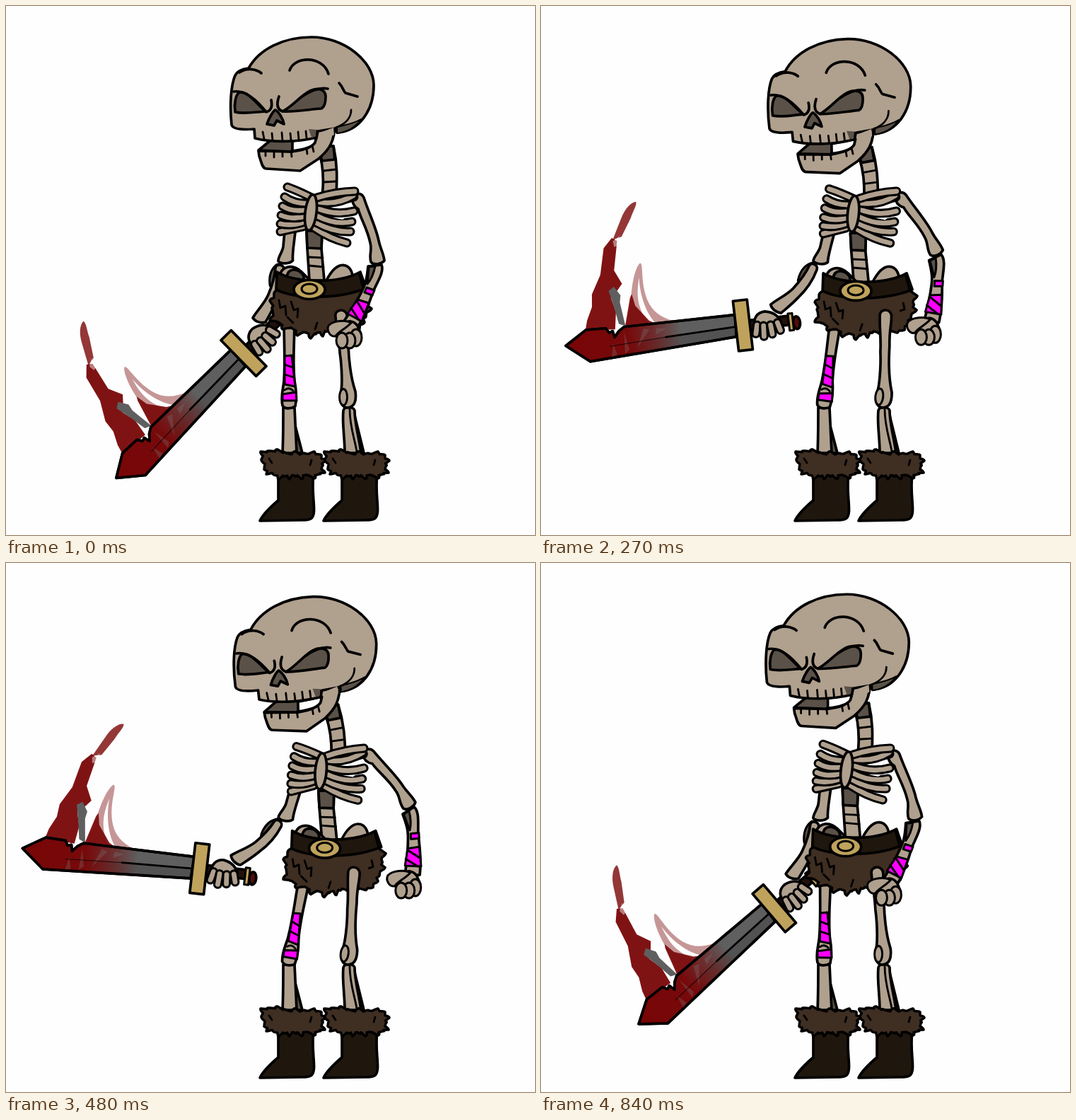
An HTML page that plays this animation: 748x748 px, repeating every 870 ms.

```html
<!DOCTYPE html>
<html lang="en">
<head>
<meta charset="utf-8">
<title>Skeleton with sword</title>
<style>
html, body { margin: 0; width: 100%; height: 100%; overflow: hidden; background: #fefefe; }
svg { display: block; width: 100%; height: 100%; }
path, ellipse, rect { fill: #b0a08e; stroke: #000; stroke-width: 3.7; stroke-linejoin: round; stroke-linecap: round; }
.line { fill: none; stroke-width: 2.8; }
.rib { fill: none; stroke-width: 13; }
.rib.core { stroke: #b0a08e; stroke-width: 6.8; }
.dark { fill: #5a5148; }
.dim.core { stroke: #5a5148; }
.gap { fill: #fefefe; }
.fur { fill: #3f2e22; stroke-width: 3.5; }
.belt { fill: #1f160d; }
.gold { fill: #bfa35c; }
.wrap { fill: #f0f; stroke-width: 3; }
.flat { stroke: none; }
.blood { fill: #780506; stroke: none; }
</style>
</head>
<body>
<svg viewBox="0 0 748 748">
<defs>
  <linearGradient id="stain" gradientUnits="userSpaceOnUse" x1="-254" x2="-88">
    <stop offset="0" stop-color="#780506"/>
    <stop offset=".55" stop-color="#780506" stop-opacity=".95"/>
    <stop offset=".8" stop-color="#780506" stop-opacity=".5"/>
    <stop offset="1" stop-color="#780506" stop-opacity="0"/>
  </linearGradient>
  <g id="boot">
    <path class="belt" d="M385 660L435 660C432 685 436 700 435.500 714C435 726 430 727 418 727L359 728C364 717 378 705 385 699Z"/>
    <path class="fur" data-tips="361 641 360 630 373 629 384 627 396 632 410 630 424 633 436 630 446 635 452 643 447 651 451 660 443 662 436 668 426 663 418 669 408 664 400 669 392 664 385 670 377 661 368 662 365 654"/>
    <path class="line" d="M372 640l4 6M432 642l-2 7"/>
  </g>
</defs>

<!-- data-move: dx dy angle pivotX pivotY at full swing -->
<g data-move="18.5 4.5 11.8 404 270">
  <g data-move="0 0 20 390 366">
    <path class="rib dim" d="M385 370Q376 378 378 394"/>
    <path d="M381 370C382 364 393 365 393 372C393 392 387 408 382 418C377 430 372 438 367 447C360 449 352 446 349 441C354 432 366 420 371 408C376 396 380 385 381 370Z"/>
    <g data-move="0 0 27 358 442">
      <g transform="translate(336 491) rotate(-44.4)">
        <path class="blood" style="opacity:.94" d="M-222 -18L-218 -32L-209 -50L-207 -68L-192 -94L-183 -131L-170 -144L-163 -139L-166 -125L-172 -98L-163 -78L-170 -70L-181 -60L-176 -40L-180 -15Z"/>
        <path class="blood" style="opacity:.8" d="M-169 -141L-153 -171C-147 -182 -138 -191 -130 -191C-129 -186 -136 -178 -140 -169L-156 -144Z"/>
        <path class="flat" style="fill:#fefefe;opacity:.45" d="M-169 -139L-158 -146L-163 -139L-160 -133L-168 -131Z"/>
        <path class="flat" style="fill:#5f5f5f" d="M-183 -70L-175 -75L-167 -62L-169 -52L-165 -18L-174 -22L-178 -47Z"/>
        <path class="blood" style="opacity:.42" d="M-164 -18L-152 -59C-148 -82 -140 -101 -134 -104C-129 -102 -138 -75 -129 -48C-122 -28 -105 -19 -85 -14L-120 -15C-134 -30 -140 -60 -138 -84C-145 -60 -146 -40 -130 -15Z"/>
        <path class="blood" style="opacity:.9" d="M-166 -16L-154 -57L-151 -62L-148 -45L-131 -22L-118 -14Z"/>
        <path style="fill:#5f5f5f" d="M-9 -16L-167 -17L-175 -12L-182 -4L-184 -13L-189 -11L-193 -18L-221 -19L-252 0L-220 26L-11 15Z"/>
        <path class="flat" style="fill:#525252" d="M-12 2L-190 8L-190 23L-12 13Z"/>
        <path style="fill:url(#stain)" d="M-9 -16L-167 -17L-175 -12L-182 -4L-184 -13L-189 -11L-193 -18L-221 -19L-252 0L-220 26L-11 15Z"/>
        <path class="flat" style="fill:#777;opacity:.3" d="M-168 -10l5 26l-7 5zM-140 -12l8 3l-20 24zM-185 5l4 16l-8 2zM-122 -10l14 2l-16 7z"/>
        <path class="line" d="M-12 1L-110 4"/>
        <path class="line" style="stroke-width:1.2;opacity:.7" d="M-110 4L-190 8"/>
        <rect x="8" y="-6" width="62" height="13" style="fill:#20110c"/>
        <ellipse cx="76" cy="5" rx="5" ry="9" style="fill:#520d0c"/>
        <rect class="gold" x="65" y="-9" width="6" height="24" style="stroke-width:3"/>
        <rect class="gold" x="-10" y="-35.5" width="20" height="71"/>
        <path d="M17 4C15 -8 22 -16 33 -16C45 -14 51 -8 54 1L37 7Z"/>
        <path class="rib" d="M20 2L17 14"/>
        <path class="rib" d="M29 4L28 19"/>
        <path class="rib" d="M39 4L40 17"/>
        <path class="rib" d="M49 2L52 13"/>
      </g>
    </g>
  </g>
  <path d="M395 290L411 290C411 320 404 345 405.500 360C401 365 389 365 385 361C384 356 391 348 392 340C394 320 395 305 395 290Z"/>
</g>

<path class="dark" d="M408 590L419 632L408 632Z"/>
<path d="M392 568L408 568C409 590 410 610 411 632L391 632C392 610 392 590 392 568Z"/>
<path class="dark" d="M492 575L506 632L494 632Z"/>
<path d="M477 572C478 566 491 566 493 572C493 590 499 610 502 632L479 632C479 610 475 590 477 572Z"/>
<path class="line" d="M486 570C486 595 493 612 496 630"/>
<use href="#boot"/>
<use href="#boot" x="90"/>

<g data-move="0 0 12 400 562">
  <path d="M393 440L408 440C408 480 405 500 408 530C411 545 411 556 409 566C402 570 394 570 391 565C388 552 392 542 393 530C395 500 393 480 393 440Z"/>
  <path class="wrap" d="M394 495L404 494L409 538L394 535Z"/>
  <path class="line" d="M394 507L405 511M394 521L407 525"/>
  <path class="line" d="M394 543Q400 538 406 544"/>
  <path class="wrap" d="M391 549L410 546L411 558L391 558Z"/>
</g>

<g data-move="20 4.5 -1 438 355">
  <path d="M425 318L447 318L446 343L450 388L429 388L426 343Z"/>
  <path class="dark" d="M425 318L447 318L446 343L426 342Z"/>
  <path class="line" d="M427 355L448 356M428 367L449 369"/>
</g>
<g data-move="25 3 0 0 0">
  <path d="M386 390C386 366 405 364 418 376L432 390Z"/>
  <path class="dark" d="M397 384C398 370 412 370 420 380L422 388Z"/>
  <path d="M452 390C460 374 470 364 480 367C489 370 490 380 492 390Z"/>
</g>

<g data-move="11.5 3 -6 456 235">
  <path d="M441 200L463 198C469 225 468 245 467 268L447 268C450 245 449 225 441 200Z"/>
  <path class="dark" d="M441 200L463 198L465 217L447 219Z"/>
  <path class="line" d="M449 233L467 231M449 249L467 248"/>
</g>

<g data-move="22 3 0 0 0">
  <path class="fur" data-tips="390 392 379 406 373 417 377 430 373 445 385 447 391 457 403 455 412 466 421 461 431 470 440 462 448 467 456 458 470 465 480 458 490 460 500 456 507 447 509 438 517 428 512 418 518 408 505 392"/>
  <path class="line" d="M386 416l2 11l7 -3l1 13M403 418l4 12l6 -2l-1 12M398 440l8 8M440 448l-3 9M498 418l2 9l-6 2"/>
</g>
<g data-move="25 3 0 0 0">
  <path class="belt" d="M383 376C410 392 470 393 501 376L509 399C470 415 410 415 382 401Z"/>
  <path class="line" d="M499 377L505 400"/>
  <ellipse class="gold" cx="429" cy="401" rx="22" ry="13.500"/>
  <ellipse class="gold" cx="429" cy="400" rx="11" ry="7" style="stroke-width:3"/>
</g>

<g data-move="0 0 9.3 483 565">
  <path d="M466 440C464 429 478 427 482 436C484 446 481 458 484 480C485 505 489 530 494 545C496 560 492 567 483 568C475 568 472 560 473 548C476 540 475 510 472 490C471 470 467 455 466 440Z"/>
  <ellipse cx="477" cy="553" rx="5.500" ry="11.500" style="stroke-width:3"/>
</g>

<g data-move="16 -2 -24.500 497 270">
  <g data-move="0 0 -5.500 523 366">
    <path d="M512 368L531 366C535 376 525 390 519 404C512 425 505 442 496 456L477 447C486 434 504 405 508 392C511 382 511 375 512 368Z"/>
    <path class="dark" d="M513 369L522 368C520 378 517 386 511 393Z" style="stroke-width:3"/>
    <path class="wrap" d="M510 398L521 402L518 409L507 405Z"/>
    <path class="wrap" d="M497 415L513 420L503 446L483 435Z"/>
    <path d="M496 417L507 435M488 427L499 444" style="stroke-width:3"/>
    <g data-move="0 0 30 488 442">
      <path d="M478 450Q488 441 497 452L502 464L470 466Z"/>
      <ellipse cx="495" cy="469" rx="8" ry="12" style="stroke-width:3"/>
      <ellipse cx="486" cy="473" rx="8" ry="11" style="stroke-width:3"/>
      <ellipse cx="475" cy="473" rx="8" ry="11" style="stroke-width:3"/>
      <path d="M488 448C480 443 462 445 456 452C453 459 458 468 466 467C470 460 480 457 488 448Z" style="stroke-width:3"/>
    </g>
  </g>
  <path d="M490 271C493 263 503 264 506 271C512 290 524 315 527 332C530 345 534 350 535 360C531 365 520 367 516 362C513 352 518 345 515 335C511 315 501 300 498 287C491 283 489 276 490 271Z"/>
</g>

<g data-move="16.5 2.5 -2.5 435 295">
  <path class="rib dim" d="M440 283L492 270"/>
  <path class="rib" d="M388 319L420 312"/>
  <path class="rib" d="M388 308Q405 312 425 304"/>
  <path class="rib" d="M389 296Q405 303 425 297"/>
  <path class="rib" d="M391 283Q405 292 426 288"/>
  <path class="rib" d="M394 270Q408 280 428 279"/>
  <path class="rib" d="M398 256Q412 261 430 270"/>
  <path class="rib" d="M436 314Q458 329 482 335"/>
  <path class="rib" d="M438 306Q462 320 487 319"/>
  <path class="rib" d="M440 297Q465 310 489 305"/>
  <path class="rib" d="M440 286Q466 297 492 290"/>
  <path class="gap flat" d="M461 280L480 277L483 284L466 285Z"/>
  <path class="gap flat" d="M462 299L480 299L476 302Z"/>
  <path class="rib" d="M440 277Q468 282 491 268"/>
  <path class="rib" d="M440 271Q465 263 493 262"/>
  <ellipse cx="431" cy="292" rx="8" ry="25.500" transform="rotate(7 431 292)"/>
</g>

<g data-move="5.2 4.5 -2 420 140">
  <g data-move="2 1 0 0 0">
    <path d="M357 205L358 212C361 220 362 230 368 230L416 233L442 216C457 203 465 192 465 165L436 170L438 188C434 200 425 203 404 206Z"/>
    <path class="dark" d="M357 204L374 190L406 190L405 206Z"/>
    <path class="gap" d="M405 191L439 185L437 193Q432 202 405 205Z"/>
    <path class="line" d="M367 206L367 212M379 206L379 214M391 206L391 213M403 205L404 213M425 202L426 209M433 197L435 206"/>
  </g>
  <path d="M319 168C316 140 318 112 324 98C327 92 334 89 343 88C358 61 392 44 432 44C478 44 520 78 520 112C520 147 500 177 468 179L466 173L441 177L439 186C410 193 375 193 352 187L351 174C338 175 321 175 319 168Z"/>
  <path class="flat" d="M444 179L463 172L464 182L443 193Z"/>
  <path class="dark flat" d="M428 174L440 175L437 185L432 186Z"/>
  <path class="dark" d="M468 180C484 178 495 170 502 160C490 167 480 168 468 171Z" style="stroke-width:2"/>
  <path class="line" d="M488 147C488 158 480 167 466 172M440 177L439 188"/>
  <path class="dark" d="M324 150C322 138 325 125 330 122C343 121 352 136 367 149C352 150 337 153 324 150Z"/>
  <path class="dark" d="M391 149C405 142 415 128 430 120C440 115 452 117 452 128C452 138 450 143 446 145C430 146 410 150 391 149Z"/>
  <path class="dark" d="M369 167C372 158 378 148 381 147C386 150 392 160 393 167L383 162L379 169Z"/>
  <path class="line" style="stroke-width:3.700" d="M322 121Q343 118 368 150Q378 147 375 133M455 117Q440 114 420 127M386 128Q380 145 391 149"/>
  <path class="line" style="stroke-width:3.700" d="M401 91C408 70 448 70 456 96M330 94C342 86 355 90 361 95M471 109C477 115 477 121 480 123L497 128"/>
  <path class="line" d="M363 178L365 188M376 180L377 190M390 179L391 191M402 180L403 190M413 178L414 189M424 177L425 187"/>
</g>
</svg>
<script>
const PERIOD = 870, PEAK = 420, STEP = 30;

// Each tuft drops straight to a notch, then bulges out to the next tip.
function furPath(tips) {
  const [cx, cy] = [0, 1].map(k => tips.reduce((sum, t) => sum + t[k], 0) / tips.length);
  const push = (x, y, d) => {
    const r = Math.hypot(x - cx, y - cy);
    return [x + (x - cx) / r * d, y + (y - cy) / r * d];
  };
  return 'M' + tips.map((a, i) => {
    const b = tips[(i + 1) % tips.length];
    const notch = push((a[0] + b[0]) / 2, (a[1] + b[1]) / 2, -3);
    const bulge = push((notch[0] + b[0]) / 2, (notch[1] + b[1]) / 2, 3);
    return `${a}L${notch}Q${bulge} ${b}`;
  }).join('L') + 'Z';
}

for (const fur of document.querySelectorAll('[data-tips]')) {
  const pairs = fur.dataset.tips.match(/\d+ \d+/g).map(s => s.split(' ').map(Number));
  fur.setAttribute('d', furPath(pairs));
}

// Bones are a black stroke with a thinner one on top.
for (const rib of document.querySelectorAll('.rib')) {
  const core = rib.cloneNode();
  core.classList.add('core');
  rib.after(core);
}

const parts = [...document.querySelectorAll('[data-move]')].map(el => [el, el.dataset.move.split(' ').map(Number)]);

function draw() {
  const t = Math.floor(performance.now() % PERIOD / STEP) * STEP;
  const p = t < PEAK ? t / PEAK : (PERIOD - t) / (PERIOD - PEAK);
  for (const [el, [dx, dy, angle, x, y]] of parts)
    el.setAttribute('transform', `translate(${dx * p} ${dy * p}) rotate(${angle * p} ${x} ${y})`);
  requestAnimationFrame(draw);
}
draw();
</script>
</body>
</html>
```
